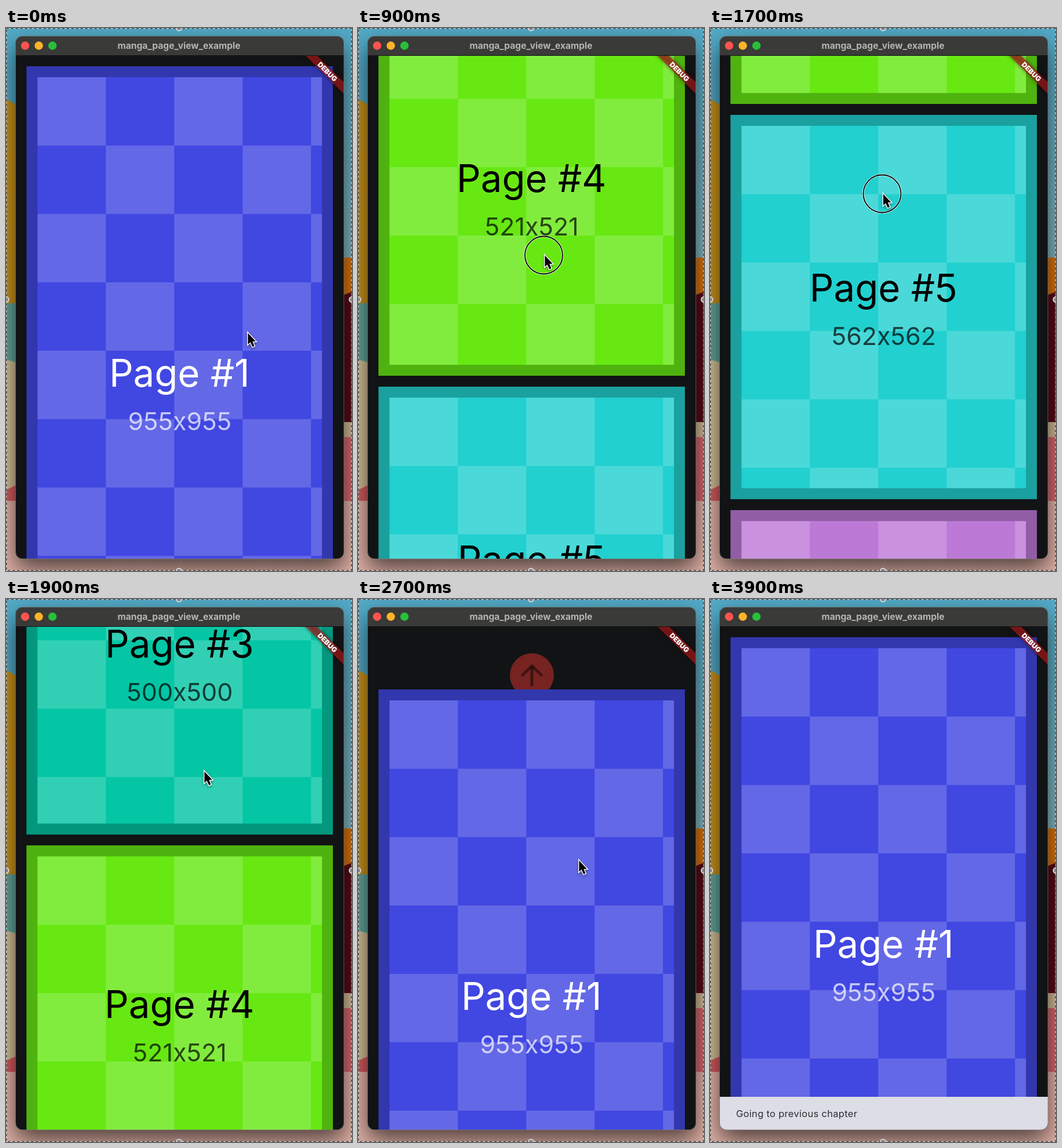
Animation of 597 by 937 pixels, one loop 4 s. Source, as an HTML page with a canvas:

```html
<!DOCTYPE html>
<html lang="en">
<head>
<meta charset="utf-8">
<title>Manga page view</title>
<style>
  html, body { margin: 0; width: 100%; height: 100%; overflow: hidden; background: #111315; }
  canvas { display: block; }
</style>
</head>
<body>
<canvas id="stage" width="597" height="937"></canvas>
<script>
const ctx = document.getElementById('stage').getContext('2d');
const W = 597, H = 937, LOOP = 4000, STEP = 100;
const SCALE = 1.18, CELL = 118, GAP = 16 * SCALE, PAGE_X = 35.4, PAGE_W = 448 * SCALE, FIRST_TOP = 66;
const WIN = { x: 16.5, y: 14, w: 566.5, h: 902, bar: 33 };

const pages = [
  [955, '#4147e1', '#fff'], [454, '#4356c8', '#fff'], [500, '#04c6a4', '#000'],
  [521, '#67e813', '#000'], [562, '#22d0cf', '#000'], [480, '#bd79d6', '#000'],
].map(([size, color, ink]) => ({ size, color, ink, h: size * SCALE }));

// Keyframes: time, then values
const scrollKeys = [[0, 0], [100, 30], [300, 420], [500, 1024], [700, 1780], [900, 2390],
  [1100, 2600], [1400, 2760], [1700, 2859], [1800, 2650], [2000, 1250], [2200, 207],
  [2400, 0], [2600, 0], [2900, -270], [3100, -349], [3200, -330], [3500, 0], [4000, 0]];
const cursorKeys = [[0, 417, 526], [500, 355, 416], [900, 322, 392], [1700, 298.5, 286],
  [2200, 407, 314], [2600, 385, 400], [3100, 365, 654], [3500, 390, 960], [4000, 390, 960]];
const snackKeys = [[0, 0], [3300, 0], [3600, 1], [4000, 1]];

const clamp = v => Math.max(0, Math.min(1, v));

function sample(keys, t) {
  const i = Math.max(1, keys.findIndex(k => k[0] >= t));
  const a = keys[i - 1], b = keys[i], p = (t - a[0]) / (b[0] - a[0]);
  return a.slice(1).map((v, n) => v + (b[n + 1] - v) * p);
}

function rect(color, x, y, w, h) {
  ctx.fillStyle = color;
  ctx.fillRect(x, y, w, h);
}

function trace(points, closed = true) {
  ctx.beginPath();
  points.forEach(([x, y]) => ctx.lineTo(x, y));
  if (closed) ctx.closePath();
}

function disc(color, x, y, r) {
  ctx.fillStyle = color;
  ctx.beginPath();
  ctx.arc(x, y, r, 0, 7);
  ctx.fill();
}

function text(str, x, y, size, color, { weight = 400, align = 'center', spacing = 0 } = {}) {
  ctx.font = `${weight} ${size}px Inter, sans-serif`;
  ctx.letterSpacing = spacing + 'px';
  ctx.textAlign = align;
  ctx.fillStyle = color;
  ctx.fillText(str, x, y);
}

function windowPath() {
  ctx.beginPath();
  ctx.roundRect(WIN.x, WIN.y, WIN.w, WIN.h, 12);
}

// One side of the wallpaper: [color, y at left edge, y at right edge] from top to bottom
function bands(x, w, list) {
  for (const [color, left, right] of list) {
    ctx.fillStyle = color;
    trace([[x, left], [x + w, right], [x + w, H], [x, H]]);
    ctx.fill();
  }
}

function drawWallpaper() {
  rect('#52aac7', 0, 0, W, H);
  bands(0, 17, [['#c8921a', 122, 132], ['#62a49a', 475, 475], ['#d3bf98', 572, 577],
    ['#d35b60', 797, 789], ['#e3b3a7', 816, 816]]);
  const sky = ctx.createLinearGradient(0, 0, 0, 396);
  sky.addColorStop(0, '#52aac7');
  sky.addColorStop(1, '#83b5bf');
  rect(sky, 582, 0, 15, 396);
  bands(582, 15, [['#d9730e', 396, 396], ['#560a18', 461, 455], ['#d3b995', 680, 680],
    ['#d9666c', 706, 706], ['#e3b3a7', 816, 816]]);
  rect('#e3b3a7', 16, 816, 567, 121);
  ctx.save();
  ctx.shadowColor = 'rgba(0,0,0,.65)';
  ctx.shadowBlur = 40;
  ctx.shadowOffsetY = 18;
  ctx.fillStyle = '#111315';
  windowPath();
  ctx.fill();
  ctx.restore();
}

function drawPage({ size, color, ink, h }, index, top) {
  rect(color, PAGE_X, top, PAGE_W, h);
  ctx.save();
  ctx.beginPath();
  ctx.rect(PAGE_X + GAP, top + GAP, PAGE_W - 2 * GAP, h - 2 * GAP);
  ctx.clip();
  for (let row = 0; row * CELL < h; row++)
    for (let col = row % 2; col < 5; col += 2)
      rect('rgba(255,255,255,.18)', PAGE_X + GAP + col * CELL, top + GAP + row * CELL, CELL, CELL);
  ctx.restore();
  ctx.strokeStyle = 'rgba(0,0,0,.23)';
  ctx.lineWidth = GAP;
  ctx.strokeRect(PAGE_X + GAP / 2, top + GAP / 2, PAGE_W - GAP, h - GAP);
  const mid = top + h / 2;
  text(`Page #${index + 1}`, 299.3, mid - 10, 65.3, ink);
  ctx.globalAlpha = .7;
  text(`${size}x${size}`, 299.8, mid + 65, 43, ink);
  ctx.globalAlpha = 1;
}

function drawPullHint(pull) {
  ctx.save();
  ctx.globalAlpha = clamp(pull / 200);
  ctx.translate(300, 261 + (pull - 349) / 2);
  disc('#f2382f', 0, 0, 38);
  ctx.strokeStyle = '#000';
  ctx.lineWidth = 5;
  trace([[0, 19], [0, -15]], false);
  ctx.stroke();
  trace([[-17.5, 1], [0, -16], [17.5, 1]], false);
  ctx.stroke();
  text('Prev. chapter', 0, 65, 16.5, '#e3e3e7', { spacing: .3 });
  ctx.restore();
}

function drawBanner() {
  ctx.save();
  ctx.translate(583, 47);
  ctx.rotate(Math.PI / 4);
  ctx.filter = 'blur(3px)';
  rect('rgba(0,0,0,.5)', -60, 33, 120, 14.2);
  ctx.filter = 'none';
  rect('rgba(183,28,28,.63)', -60, 33, 120, 14.2);
  text('DEBUG', 0, 44.5, 12, '#fff', { weight: 900 });
  ctx.restore();
}

function drawTitleBar() {
  rect('#3a3a38', WIN.x, WIN.y, WIN.w, WIN.bar);
  rect('#111315', WIN.x, WIN.y + WIN.bar, WIN.w, 1);
  ['#ff544d', '#feb429', '#25c138'].forEach((c, i) => disc(c, 33 + i * 23.6, 30.5, 7.2));
  text('manga_page_view_example', 298.5, 35.5, 15.6, '#b5b5b3', { weight: 700 });
}

function drawWindow(t) {
  const [scroll] = sample(scrollKeys, t), [snack] = sample(snackKeys, t);
  ctx.save();
  windowPath();
  ctx.clip();
  rect('#111315', WIN.x, WIN.y, WIN.w, WIN.h);
  if (scroll < 0) drawPullHint(-scroll);
  let top = FIRST_TOP - scroll;
  pages.forEach((page, i) => {
    if (top < H && top + page.h > 0) drawPage(page, i, top);
    top += page.h + GAP;
  });
  if (snack > 0) {
    const y = 916 - 57 * snack;
    rect('#dcdde5', WIN.x, y, WIN.w, 57);
    text('Going to previous chapter', 45, y + 34.5, 16.5, '#2d2f34', { align: 'left', spacing: .3 });
  }
  drawBanner();
  drawTitleBar();
  ctx.restore();
  ctx.strokeStyle = 'rgba(130,130,130,.6)';
  ctx.lineWidth = 1;
  windowPath();
  ctx.stroke();
}

function drawCursor(t) {
  const [x, y] = sample(cursorKeys, t);
  const pressed = (t >= 700 && t <= 1000) || (t >= 1500 && t <= 1700);
  ctx.save();
  ctx.translate(x, y);
  if (pressed) {
    for (const [color, width] of [['rgba(255,255,255,.8)', 3.5], ['#000', 1.8]]) {
      ctx.strokeStyle = color;
      ctx.lineWidth = width;
      ctx.beginPath();
      ctx.arc(-1.5, 0, 32.5, 0, 7);
      ctx.stroke();
    }
  }
  ctx.translate(-.5, -.5);
  ctx.scale(.93, .93);
  trace([[1, 1], [1, 22], [5.5, 18], [9.5, 26.5], [13, 25], [9.5, 16.8], [15.5, 16.5]]);
  ctx.shadowColor = 'rgba(0,0,0,.4)';
  ctx.shadowBlur = 4;
  ctx.shadowOffsetY = 2;
  ctx.strokeStyle = '#fff';
  ctx.lineWidth = 3;
  ctx.stroke();
  ctx.shadowColor = 'transparent';
  ctx.fillStyle = '#000';
  ctx.fill();
  ctx.restore();
}

function drawSelection() {
  ctx.lineWidth = 1.5;
  ctx.strokeStyle = 'rgba(225,225,225,.55)';
  ctx.strokeRect(.75, .75, W - 1.5, H - 1.5);
  ctx.strokeStyle = '#454545';
  ctx.setLineDash([4, 4]);
  ctx.strokeRect(.75, .75, W - 1.5, H - 1.5);
  ctx.setLineDash([]);
  for (const [x, y] of [[298.5, 0], [298.5, H], [0, 468.5], [W, 468.5]]) {
    disc('#dedede', x, y, 5.5);
    disc('#858585', x, y, 3.7);
  }
}

function frame(now) {
  const t = Math.floor(now % LOOP / STEP) * STEP;
  drawWallpaper();
  drawWindow(t);
  drawCursor(t);
  drawSelection();
  requestAnimationFrame(frame);
}
requestAnimationFrame(frame);
</script>
</body>
</html>
```
